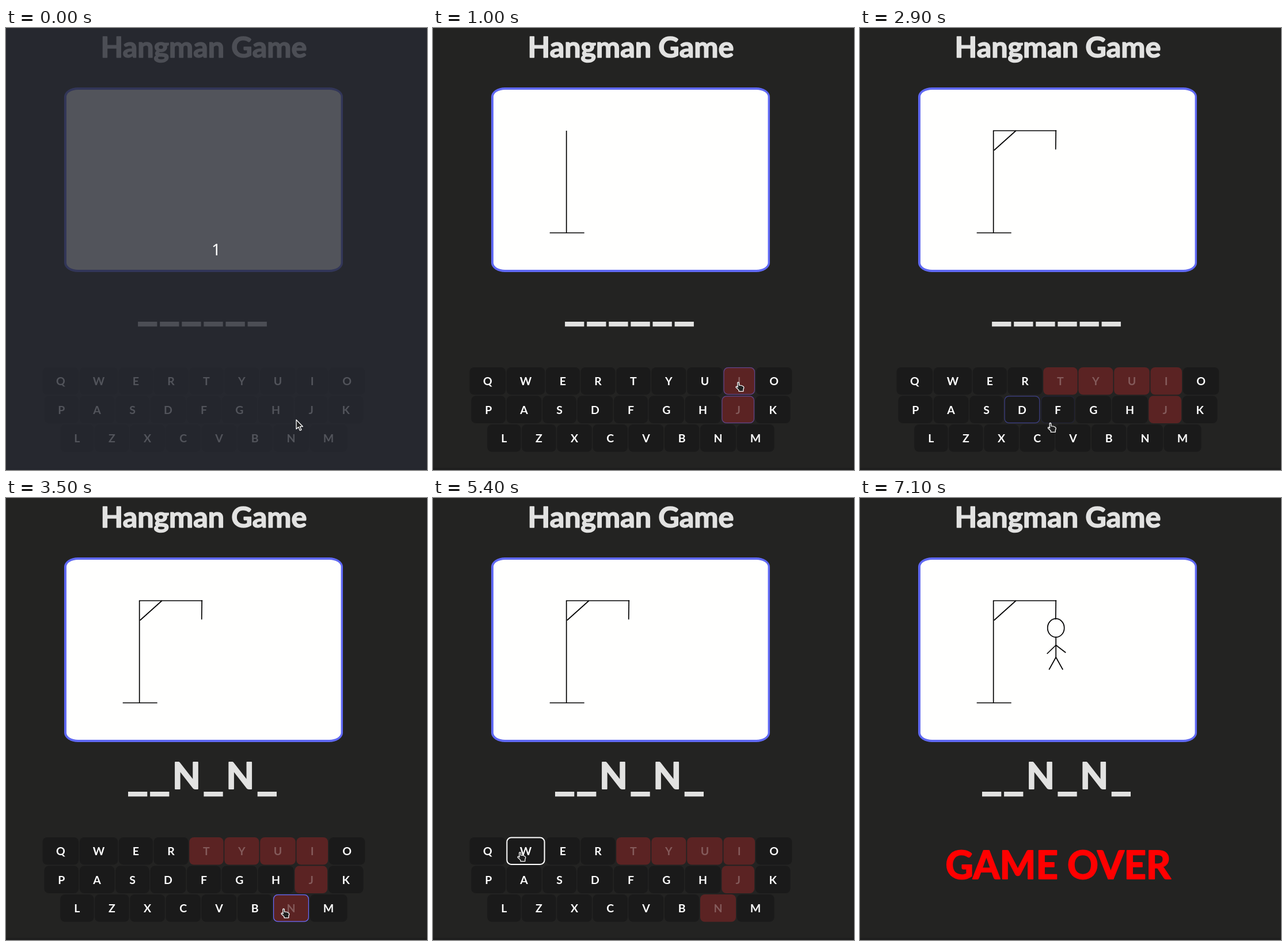
An HTML page with a canvas that plays this animation: 731 by 766 pixels, repeating every 7.7 s.

```html
<!DOCTYPE html>
<html lang="en">
<head>
<meta charset="utf-8">
<title>Hangman Game</title>
<style>
html, body { margin: 0; width: 100%; height: 100%; overflow: hidden; background: #232322; }
canvas { display: block; }
</style>
</head>
<body>
<canvas id="stage" width="731" height="766"></canvas>
<script>
const ctx = document.getElementById('stage').getContext('2d');
const W = 731, H = 766, MID = 343.4;
const LOOP = 7700, STEP = 100, FADE = 250, GAME_OVER = 5500;
const FONT = 'Lato, "Open Sans", sans-serif';
const KEY_FONT = `bold 19.5px ${FONT}`;
const INK = '#e2e2e1';

const CLICKS = { J: 300, I: 1000, U: 1300, Y: 1700, T: 2100, N: 3500 };

// Centred rows of keys, each as wide as its letter needs
function layoutKeys() {
  ctx.font = KEY_FONT;
  const gap = 1.7;
  return ['QWERTYUIO', 'PASDFGHJK', 'LZXCVBNM'].flatMap((row, r) => {
    const keys = [...row].map(letter => ({
      letter, y: 588 + 49.5 * r, w: 50 + 0.8 * ctx.measureText(letter).width, h: 47.5
    }));
    const total = keys.reduce((sum, k) => sum + k.w + gap, -gap);
    let x = MID - total / 2;
    for (const k of keys) {
      k.x = x;
      x += k.w + gap;
    }
    return keys;
  });
}
const KEYS = layoutKeys();

// Pointer moves: start time, end time, x, y reached
const MOVES = [
  [0, 100, 527, 669], [700, 1000, 530, 614], [1200, 1300, 472, 616], [1400, 1500, 427, 620],
  [1900, 2050, 356, 623], [2400, 2600, 232, 667], [2600, 3300, 482, 712],
  [3800, 4230, 118, 657], [4800, 5350, 151, 614], [5400, 5700, 113, 611], [6600, 7000, 0, 36]
];

function pointerAt(t) {
  let x = 504, y = 679;
  for (const [from, to, toX, toY] of MOVES) {
    const k = Math.min(1, Math.max(0, (t - from) / (to - from)));
    const ease = k * k * (3 - 2 * k);
    x += (toX - x) * ease;
    y += (toY - y) * ease;
  }
  return [x, y];
}

// Border strength of every key per step, from the pointer's time over it
function hoverTable() {
  const table = [], glow = KEYS.map(() => 0), dt = 10;
  for (let t = 0; t < LOOP; t += dt) {
    if (t % STEP === 0) table.push([...glow]);
    const [px, py] = pointerAt(t);
    KEYS.forEach((k, i) => {
      const over = px >= k.x && px <= k.x + k.w && py >= k.y && py <= k.y + k.h;
      glow[i] = Math.min(1, Math.max(0, glow[i] + (over ? dt : -dt) / FADE));
    });
  }
  return table;
}
const HOVER = hoverTable();

function rounded(x, y, w, h, r) {
  ctx.beginPath();
  ctx.roundRect(x, y, w, h, r);
}

function text(str, x, y, font, color) {
  ctx.font = font;
  ctx.textAlign = 'center';
  ctx.fillStyle = color;
  ctx.fillText(str, x, y);
}

// Bold text thickened by an outline of its own colour
function heading(str, x, y, size, color) {
  const extra = size * 0.032;
  text(str, x, y - extra / 2, `bold ${size}px ${FONT}`, color);
  ctx.strokeStyle = color;
  ctx.lineWidth = extra;
  ctx.strokeText(str, x, y - extra / 2);
}

function line(...pts) {
  ctx.beginPath();
  for (let i = 0; i < pts.length; i += 2) ctx.lineTo(pts[i], pts[i + 1]);
  ctx.stroke();
}

function drawBoard() {
  rounded(101, 103, 484, 320, { x: 24, y: 16 });
  ctx.fillStyle = '#5f68f2';
  ctx.fill();
  rounded(105, 107, 476.5, 312, { x: 20, y: 12 });
  ctx.fillStyle = '#fffffe';
  ctx.fill();
}

function drawGallows(t) {
  const post = 231.7, top = 178, base = 355, rope = 340.2;
  ctx.strokeStyle = '#000';
  ctx.lineWidth = 1.7;
  if (t >= CLICKS.J) line(post - 29, base, post + 31, base);
  if (t >= CLICKS.I) line(post, top, post, base);
  if (t >= CLICKS.U) line(post - 0.8, top, rope + 1, top);
  if (t >= CLICKS.Y) line(post + 1, top + 34, post + 39, top);
  if (t >= CLICKS.T) line(rope, top - 1, rope - 0.5, top + 32.5);
  if (t >= GAME_OVER) drawFigure(rope);
}

function drawFigure(x) {
  ctx.beginPath();
  ctx.ellipse(x, 225.2, 14.5, 16, 0, 0, Math.PI * 2);
  ctx.stroke();
  line(x, 241, x, 276.5);
  line(x - 15.5, 270, x, 255, x + 17, 268);
  line(x - 12, 297.5, x, 276, x + 12, 297.5);
}

function drawWord(t) {
  const word = t >= CLICKS.N ? '__N_N_' : '______';
  const spacing = 4.8;
  const advance = c => (c === '_' ? 33.3 : 50.4) + spacing;
  let x = MID - [...word].reduce((sum, c) => sum + advance(c), 0) / 2;
  for (const c of word) {
    const w = advance(c) - spacing;
    ctx.fillStyle = INK;
    if (c === '_') ctx.fillRect(x, 509, w, 8.3);
    else heading(c, x + w / 2, 505, 63.5, INK);
    x += w + spacing;
  }
}

function drawKeys(t) {
  const glow = HOVER[t / STEP];
  KEYS.forEach((k, i) => {
    const used = t >= CLICKS[k.letter];
    rounded(k.x, k.y, k.w, k.h, 8);
    ctx.fillStyle = used ? '#5b2323' : '#1a1a1a';
    ctx.fill();
    const focused = k.letter === 'W' && t >= 5300;
    if (focused || glow[i] > 0) {
      rounded(k.x + 0.6, k.y + 0.6, k.w - 1.2, k.h - 1.2, 7.5);
      ctx.lineWidth = focused ? 2 : 1.2;
      ctx.strokeStyle = focused ? '#fff' : `rgba(100,108,255,${glow[i]})`;
      ctx.stroke();
    }
    text(k.letter, k.x + k.w / 2, k.y + 31, KEY_FONT, used ? '#845b5b' : '#fff');
  });
}

const ARROW = new Path2D('M0 0V16L3.8 12.6L6.4 18.5L9 17.4L6.4 11.7H11.4Z');
const HAND = new Path2D('M-1.3 .6Q0 -1 1.3 .6L1.6 5.2Q6 5.2 8.2 6.8Q10 7.3 9.8 9.5L8.8 12.5V15.6H1V13.6L-3.8 9Q-4.4 7 -2.4 7.2L-.9 8.6Z');

function drawPointer(t) {
  if (t > 7000) return;
  const shape = t < 100 || t >= GAME_OVER ? ARROW : HAND;
  ctx.save();
  ctx.translate(...pointerAt(t));
  ctx.lineWidth = 1.3;
  ctx.fillStyle = '#222';
  ctx.strokeStyle = '#fff';
  ctx.fill(shape);
  ctx.stroke(shape);
  ctx.restore();
}

function draw(t) {
  ctx.lineJoin = 'round';
  ctx.fillStyle = '#232322';
  ctx.fillRect(0, 0, W, H);
  ctx.fillStyle = '#1e1e1e';
  ctx.fillRect(0, H - 4, W, 4);
  ctx.fillRect(W - 1, 0, 1, H);
  heading('Hangman Game', MID, 51.5, 50.3, INK);
  drawBoard();
  drawGallows(t);
  drawWord(t);
  if (t < GAME_OVER) drawKeys(t);
  else heading('GAME OVER', MID + 0.6, 661.5, 66.6, '#f00');
  if (t < 100) {
    ctx.fillStyle = 'rgba(39,42,51,.8)';
    ctx.fillRect(0, 0, W, H);
    text('1', 365, 394, '28px "Noto Sans", sans-serif', '#fff');
  }
  drawPointer(t);
}

const start = performance.now();
function tick() {
  const t = (performance.now() - start) % LOOP;
  draw(Math.floor(t / STEP) * STEP);
  requestAnimationFrame(tick);
}
tick();
</script>
</body>
</html>
```
